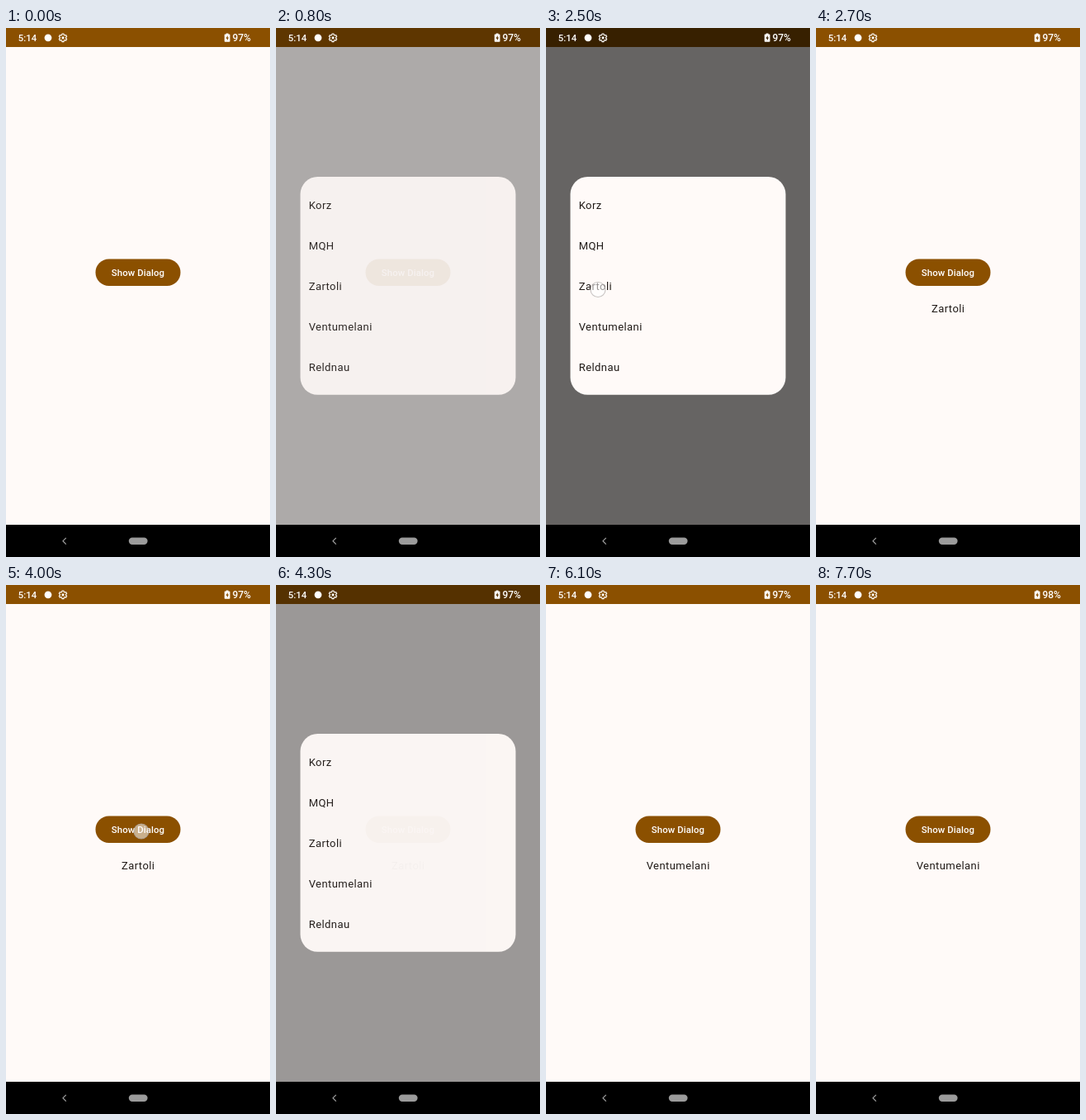
An HTML page that plays this animation: 320 px wide and 640 px high, repeating every 8 s.

```html
<!DOCTYPE html>
<html lang="en">
<head>
<meta charset="utf-8">
<title>Dialog picker</title>
<style>
  html, body { margin: 0; width: 100%; height: 100%; overflow: hidden; background: #000; }
  svg { display: block; width: 100%; height: 100%; }
  text { font-family: Roboto, sans-serif; }
  .body { font-size: 13.04px; letter-spacing: .41px; fill: #201a17; }
  .label { font-size: 11.4px; font-weight: 500; letter-spacing: .08px; fill: #fff; }
  .status { font-weight: 500; fill: #fff; }
</style>
</head>
<body>
<svg viewBox="0 0 320 640" xmlns="http://www.w3.org/2000/svg">
  <rect width="320" height="640" fill="#fffaf8"/>
  <rect width="320" height="23" fill="#8b5000"/>

  <rect x="108.5" y="279.4" width="103" height="32.6" rx="16.3" fill="#8b5000"/>
  <rect id="press" x="108.5" y="279.4" width="103" height="32.6" rx="16.3" fill="#fff"/>
  <text class="label" x="160" y="300.2" text-anchor="middle">Show Dialog</text>
  <text id="result" class="body" x="160.2" y="344" text-anchor="middle"></text>

  <rect id="scrim" width="320" height="601" fill="#000"/>
  <g id="dialog">
    <rect x="29.5" y="180" width="261" height="263.8" rx="21" fill="#fffaf8"/>
    <g id="rows"></g>
  </g>

  <text class="status" x="14.8" y="15.8" font-size="11.3">5:14</text>
  <circle cx="51" cy="11.8" r="4.4" fill="#fff"/>
  <path id="gear" fill="none" stroke="#fff" stroke-width="1.15" stroke-linejoin="round"/>
  <circle cx="69" cy="11.8" r="1.6" fill="#fff"/>
  <path d="M266.8 6.4h2.7v1.1h1.2q.8 0 .8.8v7.6q0 .8-.8.8h-5.1q-.8 0-.8-.8v-7.6q0-.8.8-.8h1.2z" fill="#fff"/>
  <path id="bolt" d="M268.7 8.9l-2.3 3.8h1.5v2.6l2.2-3.8h-1.4z"/>
  <text id="charge" class="status" x="274.4" y="15.9" font-size="12"></text>

  <rect y="601" width="320" height="39"/>
  <path d="M72.8 616.8L69 620.7L72.8 624.6" fill="none" stroke="#a0a0a0" stroke-width="1.2"/>
  <rect x="148.8" y="616.4" width="22.8" height="8.5" rx="4.2" fill="#9b9b9b"/>

  <circle id="touch" r="9" fill="#fff" fill-opacity=".55" stroke="#b4b0af" stroke-opacity=".75" stroke-width="1.1"/>
</svg>
<script>
const LOOP = 8000, STEP = 100;
const names = ["Korz", "MQH", "Zartoli", "Ventumelani", "Reldnau"];
const el = id => document.getElementById(id);
const clamp = v => Math.max(0, Math.min(1, v));

// Each round: open the dialog, pick a row, close it.
const rounds = [
  { press: 500, open: 720, tap: 2400, close: 2550, row: 2, at: [63, 316.5] },
  { press: 4000, open: 4202, tap: 5800, close: 5950, row: 3, at: [75, 360.5] }
];
const buttonAt = [164, 298];

names.forEach((name, i) => {
  const t = document.createElementNS("http://www.w3.org/2000/svg", "text");
  t.setAttribute("class", "body");
  t.setAttribute("x", 39.7);
  t.setAttribute("y", 219.2 + i * 48.9);
  t.textContent = name;
  el("rows").append(t);
});

function gearPath(cx, cy, teeth) {
  const pts = [];
  for (let i = 0; i < teeth; i++) {
    for (const [off, r] of [[-.36, 3.6], [-.22, 4.9], [.22, 4.9], [.36, 3.6]]) {
      const a = i * 2 * Math.PI / teeth + off + Math.PI / 2;
      pts.push((cx + r * Math.cos(a)).toFixed(2) + " " + (cy + r * Math.sin(a)).toFixed(2));
    }
  }
  return "M" + pts.join("L") + "Z";
}
el("gear").setAttribute("d", gearPath(69, 11.8, 6));

function draw(t) {
  let dim = 0, alpha = 0, press = 0, touch = null, picked = "";
  for (const r of rounds) {
    if (t >= r.press && t < r.open) {
      touch = buttonAt;
      press = clamp((t - r.press) / 200) * .12;
    }
    if (t >= r.tap && t < r.close) touch = r.at;
    if (t >= r.close) picked = names[r.row];
    if (t >= r.open && t < r.close + 150) {
      const shown = clamp((t - r.open) / 150);
      const gone = clamp((t - r.close) / 150);
      dim = .6 * shown * (1 - gone);
      alpha = (1 - (1 - shown) ** 3) * (1 - gone) ** 2;
    }
  }
  el("scrim").setAttribute("opacity", dim);
  el("dialog").setAttribute("opacity", alpha);
  el("press").setAttribute("opacity", press);
  el("result").textContent = picked;
  el("charge").textContent = t < 7700 ? "97%" : "98%";
  const k = 1 - dim;
  el("bolt").setAttribute("fill", `rgb(${139 * k},${80 * k},0)`);
  el("touch").setAttribute("opacity", touch ? 1 : 0);
  if (touch) el("touch").setAttribute("transform", `translate(${touch})`);
}

const start = performance.now();
function tick() {
  const t = (performance.now() - start) % LOOP;
  draw(Math.floor(t / STEP) * STEP);
  requestAnimationFrame(tick);
}
draw(0);
requestAnimationFrame(tick);
</script>
</body>
</html>
```
